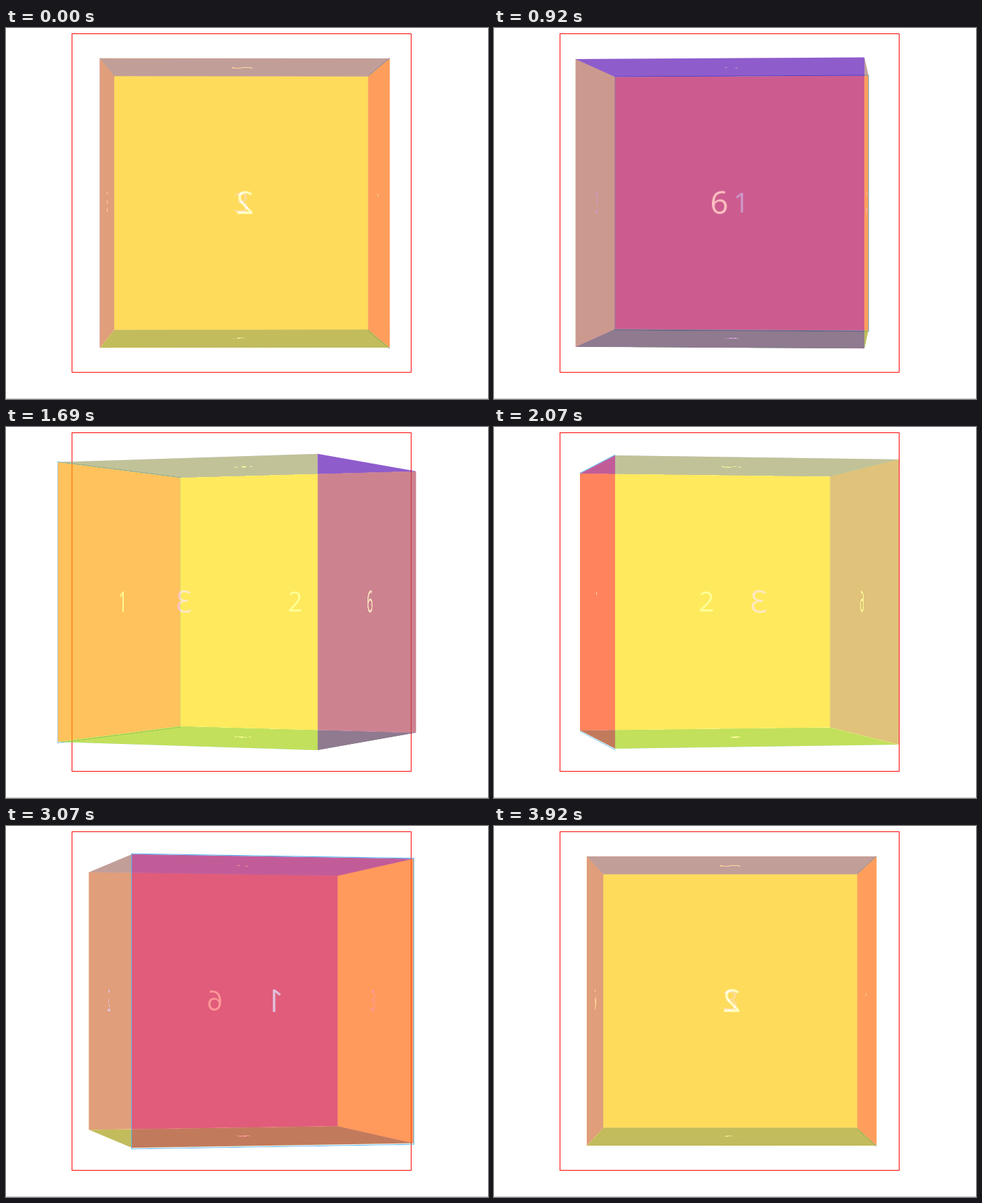
These frames come from a looping animation (712 px wide and 549 px high, 4000 ms). An HTML page:

```html
<!DOCTYPE html>
<html lang="en">
<head>
<meta charset="utf-8">
<title>Rotating cube</title>
<style>
  html, body { margin: 0; width: 100%; height: 100%; overflow: hidden; background: #fff; }
  .stage { position: absolute; left: 0; top: 0; width: 712px; height: 549px; overflow: hidden; }
  .box { position: absolute; left: 97px; top: 8px; width: 500px; height: 500px; border: 1px solid red; }
  .rule { position: absolute; left: 0; top: 548px; width: 712px; height: 1px; background: #c8c8c8; }
  .scene {
    position: absolute; left: 0; top: 0; width: 712px; height: 549px;
    perspective: 3000px; perspective-origin: 350px 259px;
  }
  .cube {
    position: absolute; left: 150px; top: 59px; width: 400px; height: 400px;
    transform-style: preserve-3d;
  }
  .face {
    position: absolute; left: 0; top: 0; width: 400px; height: 400px; opacity: .4;
    font: 44px/397px "Open Sans", "Noto Sans", sans-serif; color: #fff; text-align: center;
  }
  .one   { background: red;    transform: translateZ(-200px); }
  .two   { background: orange; transform: rotateY(-90deg) translateZ(-200px); }
  .three { background: yellow; transform: rotateY(90deg) translateZ(-200px); }
  .four  { background: green;  transform: rotateX(90deg) translateZ(-200px); }
  .five  { background: blue;   transform: rotateX(-90deg) translateZ(-200px); }
  .six   { background: purple; transform: translateZ(200px); }
  .outline {
    position: absolute; left: -1px; top: -1px; width: 400px; height: 401px;
    border: 1px solid #55aeee; transform-origin: 201px 201px; transform: translateZ(-200px);
  }
</style>
</head>
<body>
<div class="stage">
  <div class="box"></div>
  <div class="rule"></div>
  <div class="scene">
    <div class="cube" id="cube">
      <div class="face one">1</div>
      <div class="face two">2</div>
      <div class="face three">3</div>
      <div class="face four">4</div>
      <div class="face five">5</div>
      <div class="face six">6</div>
      <div class="outline"></div>
    </div>
  </div>
</div>
<script>
  const LOOP = 4000, STEPS = 52;
  const START = -89.25, TURN = 7.05; // degrees, degrees per step
  const cube = document.getElementById('cube');
  const t0 = performance.now();

  // Steps are evenly spaced, with start times rounded down to 10 ms.
  function stepAt(ms) {
    const tick = Math.floor(ms / 10) * 10;
    return Math.min(STEPS - 1, Math.floor((tick + 9.99) * STEPS / LOOP));
  }

  function draw(now) {
    const ms = Math.max(0, now - t0) % LOOP;
    cube.style.transform = `rotateY(${START + TURN * stepAt(ms)}deg)`;
    requestAnimationFrame(draw);
  }
  draw(t0);
</script>
</body>
</html>
```
